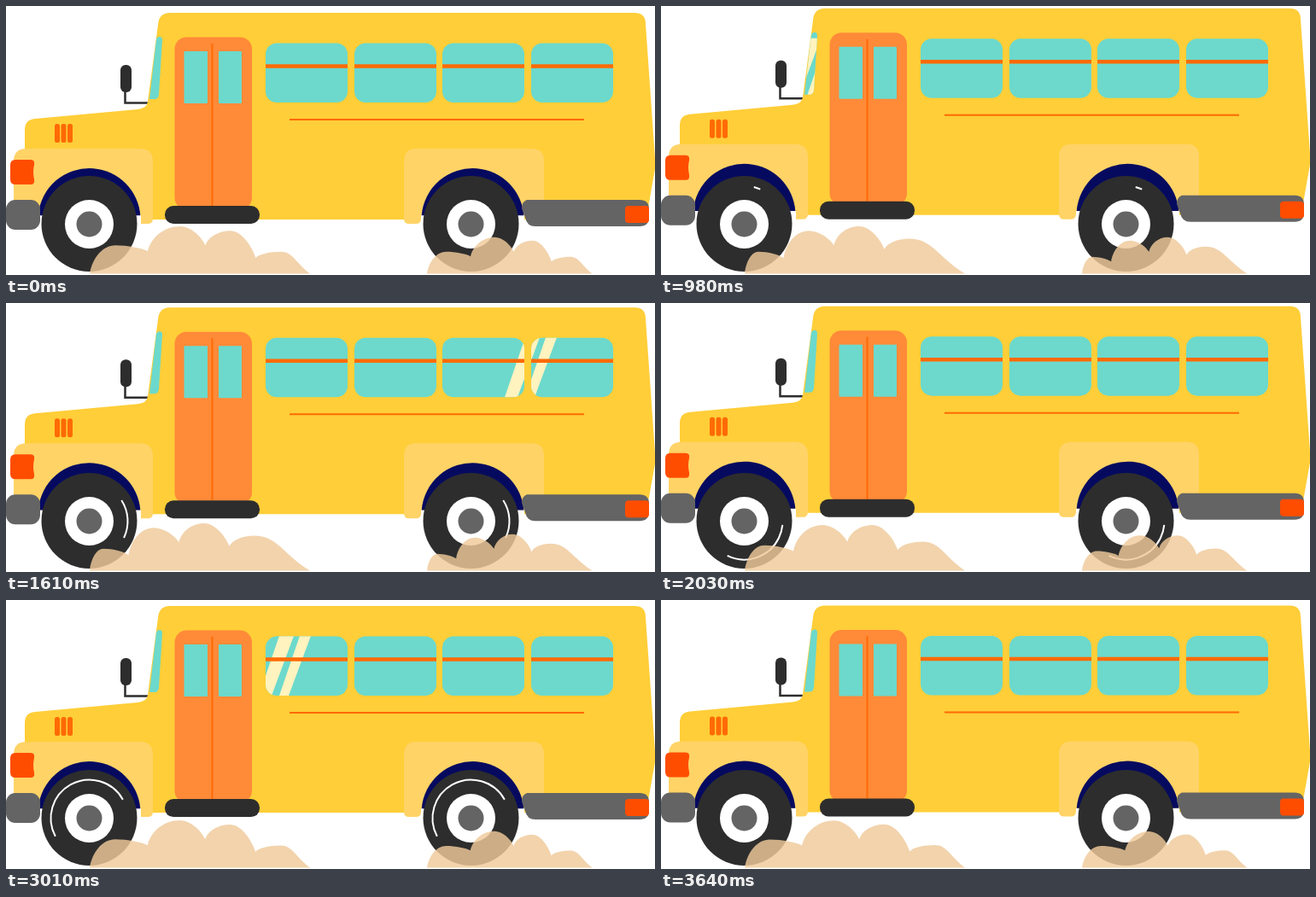
Animation, 760 px wide and 315 px high, one loop 3.71 s. Source, as an HTML page with a canvas:

```html
<!DOCTYPE html>
<html>
<head>
<meta charset="utf-8">
<title>School bus</title>
<style>
html, body { margin: 0; width: 100%; height: 100%; overflow: hidden; background: #fff; }
canvas { display: block; }
</style>
</head>
<body>
<canvas id="stage" width="760" height="315"></canvas>
<script>
const c = document.getElementById('stage').getContext('2d');
const STEP = 70, FRAMES = 53;
const BOUNCE = FRAMES / 5, SPIN = FRAMES / 3, PUFF = 8.5;
const YELLOW = '#ffce38', PALE = '#ffd366', ORANGE = '#ff6a05', DOOR = '#ff8a38',
      GLASS = '#6cd9cc', DARK = '#2d2d2d', GREY = '#646464', RED = '#ff4d00',
      NAVY = '#060a5f', CREAM = '#fff3bf', DUST = 'rgba(239,202,154,.82)';
const WINDOWS = [304, 408, 511, 615];
const GROUND = 313.5;

// Reflections: step at which each crosses the third window, and its speed.
const sweeps = [{ cross: 7.1, speed: 56.5 }, { cross: 23.85, speed: 56.5 }, { cross: 35, speed: 30 }];

const body = new Path2D('M22 245V145Q22 133 34 132L154 121Q165 120 166 112L178 22Q179 8 192 8H736Q749 8 749 21L760 178V191L752 236L640 250H607V245H486V250H158V245Z');
const windshield = new Path2D('M176 39Q177 36 180 36Q183 36 183 40L179 104Q178 109 174 109H168Z');
const frontFender = new Path2D('M9 240V182Q9 167 24 167H157Q172 167 172 182V249Q172 255 166 255H158V245H9Z');
const rearFender = new Path2D('M466 182Q466 167 480 167H616Q630 167 630 181V245H486V249Q486 255 480 255H472Q466 255 466 249Z');
const rearBumper = new Path2D('M610 227H742Q753 227 753 238V247Q753 258 742 258H620Q610 258 608 248L604 237Q604 229 610 227Z');
const headlight = new Path2D('M11 180H29Q34 180 33 186Q31 194 33 203Q34 209 29 209H11Q5 209 5 203V186Q5 180 11 180Z');

const mix = (a, b, k) => a + (b - a) * k;
const cycle = (f, period) => f / period % 1;

function fill(path, color) { c.fillStyle = color; c.fill(path); }
function box(x, y, w, h, r) {
  const p = new Path2D();
  p.roundRect(x, y, w, h, r);
  return p;
}
function disc(x, y, r, color, from = 0, to = 7) {
  c.beginPath();
  c.arc(x, y, r, from, to);
  c.fillStyle = color;
  c.fill();
}
function line(color, width, ...p) {
  c.beginPath();
  for (let i = 0; i < p.length; i += 2) c.lineTo(p[i], p[i + 1]);
  c.strokeStyle = color;
  c.lineWidth = width;
  c.stroke();
}

function stripe(x, width) {
  c.beginPath();
  c.moveTo(x, 43);
  c.lineTo(x + width, 43);
  c.lineTo(x + width - 26, 113);
  c.lineTo(x - 24, 113);
  c.fillStyle = CREAM;
  c.fill();
}
function glass(path, f) {
  fill(path, GLASS);
  c.save();
  c.clip(path);
  for (const { cross, speed } of sweeps) {
    const x = 560 - (f - cross) * speed;
    stripe(x, 17);
    stripe(x + 24, 13);
  }
  c.restore();
}

function bus(f) {
  const t = cycle(f, BOUNCE);
  c.save();
  c.translate(0, -16.4 * Math.min(t, 1 - t));
  line(DARK, 2.5, 139.5, 98, 139.5, 113.5, 168, 113.5);
  fill(box(134, 69, 13, 32, 6), DARK);
  fill(body, YELLOW);
  glass(windshield, f);
  fill(frontFender, PALE);
  fill(rearFender, PALE);
  for (const x of [97.5, 546.5]) disc(x, 250, 60, NAVY, Math.PI + .08, -.08);
  fill(box(0, 227, 40, 35, 11), GREY);
  fill(rearBumper, GREY);
  fill(headlight, RED);
  fill(box(725, 234, 28, 20, 4), RED);
  for (let i = 0; i < 3; i++) fill(box(57 + 7.5 * i, 138, 6, 22, 2.5), ORANGE);
  fill(box(197.5, 36.5, 90.5, 202, 14), DOOR);
  fill(box(208.5, 53, 27.5, 61, 1), GLASS);
  fill(box(249, 53, 27, 61, 1), GLASS);
  line(ORANGE, 2, 241.5, 44, 241.5, 234);
  fill(box(186, 234, 111, 21, 10), DARK);
  for (const x of WINDOWS) {
    glass(box(x, 43.5, 96, 69.5, 13), f);
    line(ORANGE, 4.5, x, 70.5, x + 96, 70.5);
  }
  line(ORANGE, 2, 332, 133, 677, 133);
  c.restore();
}

// The shine runs counterclockwise, stretching out mid-turn and shrinking away.
function wheel(x, f) {
  disc(x, 255, 56, DARK);
  disc(x, 255.5, 28.5, '#fff');
  disc(x, 255.5, 15, GREY);
  const t = cycle(f, SPIN);
  const middle = 870 * t - 259, half = 102 * Math.sin(Math.PI * t) ** 6;
  if (half < 1) return;
  const angle = deg => -deg * Math.PI / 180;
  c.beginPath();
  c.arc(x, 255.5, 45, angle(middle - half), angle(middle + half), true);
  c.strokeStyle = '#fff';
  c.lineWidth = 2;
  c.stroke();
}

// Four humps under one arched envelope; each puff pushes them back, then they settle.
function dust(f, x, sx, sy) {
  const push = Math.max(0, 1 - (cycle(f, PUFF) * 1.7) ** 2);
  const top = x => 258 + .0028 * (x - 218) ** 2;
  const apex = i => 114 + 59 * i + push * (i ? 31 : 14);
  c.save();
  c.translate(x, GROUND);
  c.scale(sx, sy);
  c.translate(-98, -314);
  c.beginPath();
  c.moveTo(98, 314);
  let px = 98, py = 314;
  for (let i = 0; i < 4; i++) {
    const ax = apex(i), ay = top(ax), last = i === 3;
    const qx = last ? 356 : (ax + apex(i + 1)) / 2;
    const qy = last ? 314 : top(qx) + 22;
    c.bezierCurveTo(mix(px, ax, .1), mix(py, ay, .55), mix(ax, px, .5), ay, ax, ay);
    c.bezierCurveTo(mix(ax, qx, .4), ay, mix(qx, ax, last ? .5 : .18), mix(qy, ay, .5), qx, qy);
    [px, py] = [qx, qy];
  }
  c.closePath();
  c.fillStyle = DUST;
  c.fill();
  c.restore();
}

function draw(ms) {
  const f = Math.floor(ms / STEP) % FRAMES;
  c.clearRect(0, 0, 760, 315);
  bus(f);
  wheel(97.5, f);
  wheel(544.5, f);
  dust(f, 98, 1, 1);
  dust(f, 493, .75, .77);
}

const start = performance.now();
function tick() {
  draw(performance.now() - start);
  requestAnimationFrame(tick);
}
tick();
</script>
</body>
</html>
```
